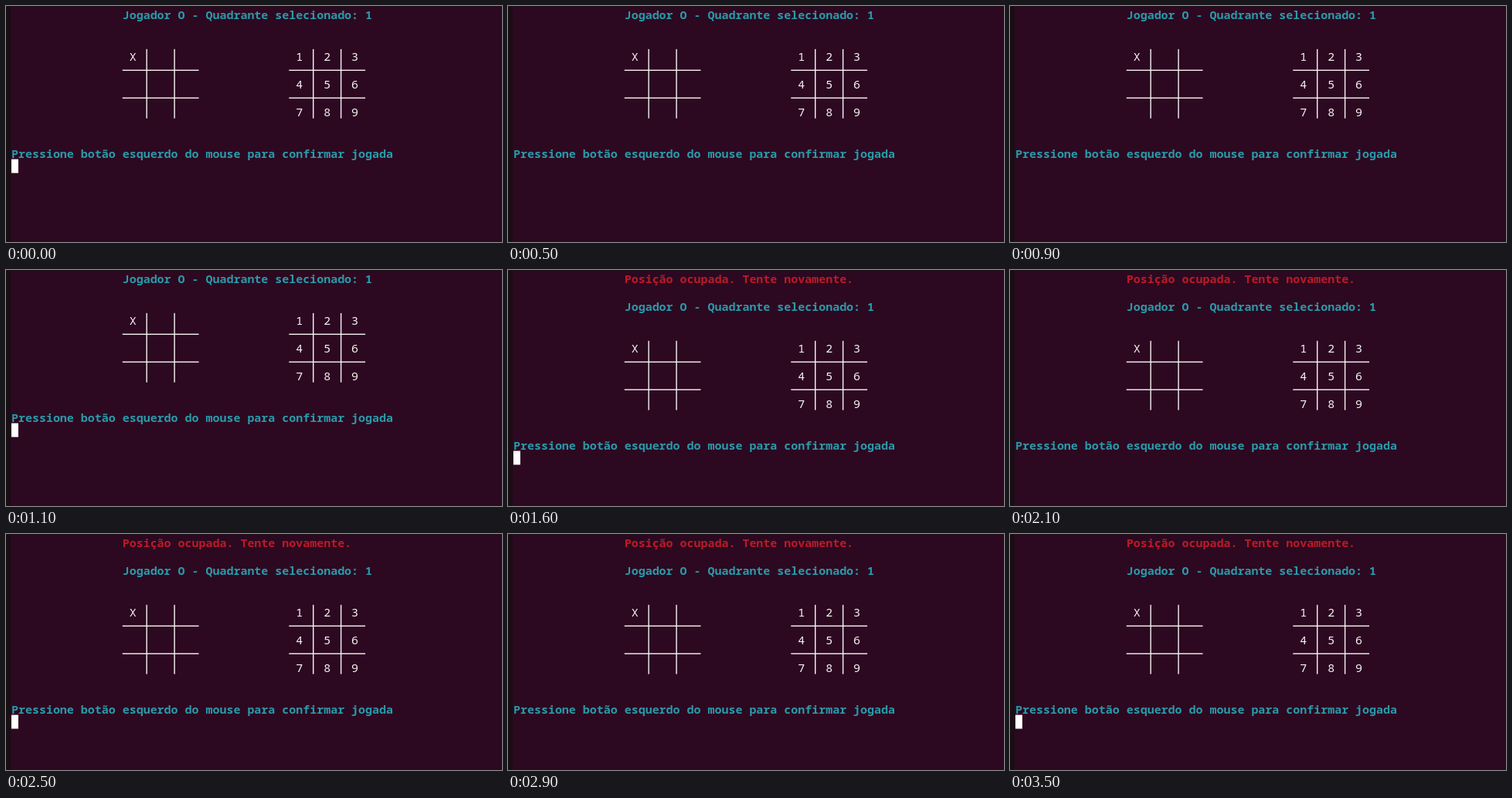
Recreate the animation shown at these times as an HTML page with a canvas. Size 642 px wide and 306 px high, loop 3800 ms.

```html
<!DOCTYPE html>
<html lang="pt">
<head>
<meta charset="utf-8">
<style>
  html, body { margin: 0; width: 100%; height: 100%; overflow: hidden; background: #2c0920; }
  canvas { display: block; }
</style>
</head>
<body>
<canvas id="screen" width="642" height="306"></canvas>
<script>
const ctx = document.getElementById('screen').getContext('2d');
const LOOP = 3800, CELL_W = 9, CELL_H = 18, LEFT = 7, TOP = 1;
const SCALE = 0.998; // the terminal is shown slightly reduced
const LINE = 1.4;
const CYAN = '#2a9aab', RED = '#bc1a27', WHITE = '#f8f4f6';

const colX = col => LEFT + col * CELL_W;
const rowY = row => TOP + row * CELL_H;

function rect(color, x, y, w, h) {
  ctx.fillStyle = color;
  ctx.fillRect(x, y, w, h);
}

function write(text, col, row, color, weight = 700) {
  ctx.font = `${weight} 15px "Noto Sans Mono", "DejaVu Sans Mono", monospace`;
  ctx.fillStyle = color;
  ctx.fillText(text, colX(col), rowY(row) + 16);
}

function board(col, row, marks) {
  const x = colX(col), y = rowY(row);
  for (const i of [0, 1]) {
    rect(WHITE, x + 31.5 + i * 36 - LINE / 2, y + 1, LINE, 90);
    rect(WHITE, x, y + 28.5 + i * 36 - LINE / 2, 99, LINE);
  }
  [...marks].forEach((mark, i) =>
    write(mark, col + 1 + (i % 3) * 4, row + Math.floor(i / 3) * 2, WHITE, 500));
}

// The cursor blinks every 600 ms; each redraw of the game restarts it.
const cursorOn = t => t < 500 || (t >= 1100 && t < 2100) || (t >= 2300 && t < 2900) || t >= 3500;

function draw(t) {
  const rejected = t >= 1600;
  const row = rejected ? 2 : 0;
  ctx.setTransform(1, 0, 0, 1, 0, 0);
  rect('#2c0920', 0, 0, 642, 306);
  rect('#180e14', 0, 0, 6, 306);
  rect('#1d1019', 0, 0, 642, 1);

  ctx.scale(SCALE, SCALE);
  if (rejected) write('Posição ocupada. Tente novamente.', 16, 0, RED);
  write('Jogador O - Quadrante selecionado: 1', 16, row, CYAN);
  board(16, row + 3, 'X');
  board(40, row + 3, '123456789');
  write('Pressione botão esquerdo do mouse para confirmar jogada', 0, row + 10, CYAN);
  if (cursorOn(t)) rect('#ffffff', colX(0), rowY(row + 11), CELL_W, CELL_H);
}

const start = performance.now();
function tick() {
  draw((performance.now() - start) % LOOP);
  requestAnimationFrame(tick);
}
tick();
</script>
</body>
</html>
```
